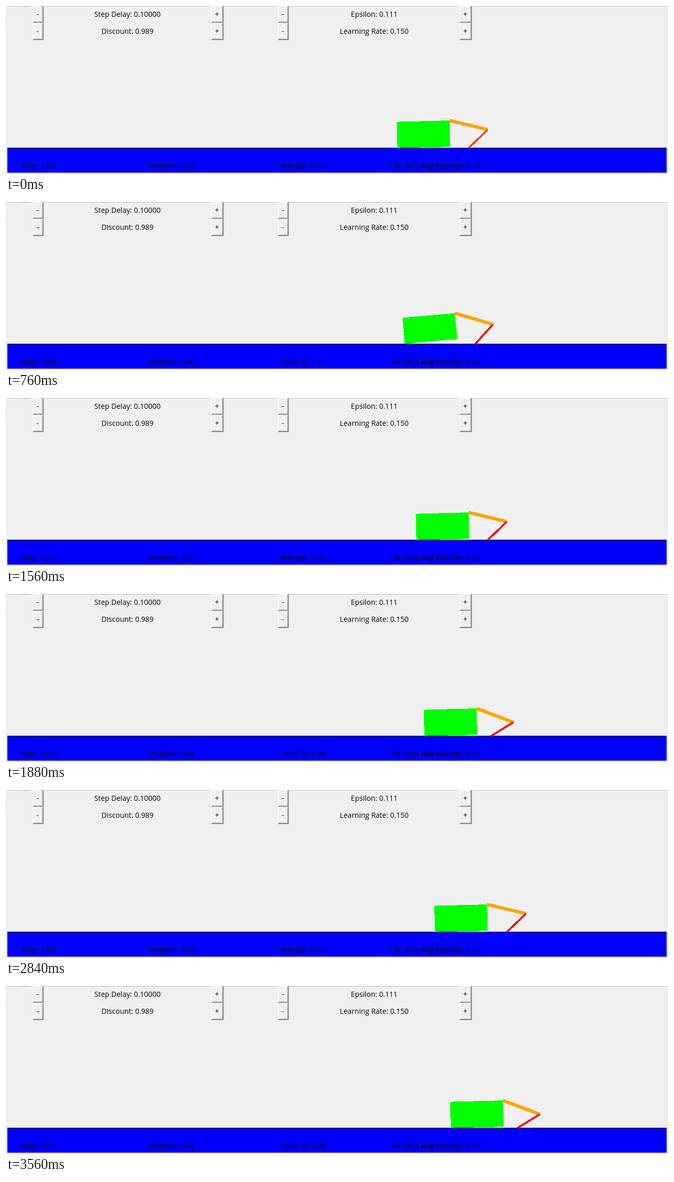
Animation, 1280 px wide and 326 px high, one loop 3600 ms. Source, as an HTML page:

```html
<!DOCTYPE html>
<html lang="en">
<head>
<meta charset="utf-8">
<title>Crawling robot</title>
<style>
  html, body { margin: 0; width: 100%; height: 100%; overflow: hidden; background: #f0f0f0; }
  svg { display: block; }
  text { font: 14px "Open Sans", "Noto Sans", sans-serif; text-anchor: middle; }
  #readout text { font-size: 14.3px; }
  .crisp { shape-rendering: crispEdges; }
</style>
</head>
<body>
<svg width="1280" height="326" viewBox="0 0 1280 326">
  <path class="crisp" d="M0 .5H1280" stroke="#c4c4c4"/>
  <path class="crisp" d="M30 .5H43" stroke="#909090"/>
  <path class="crisp" d="M.5 25V38" stroke="#d0d0d0"/>
  <g id="controls"></g>
  <path fill="#00f" d="M2.55 275H1277.45V323.45H2.55Z"/>
  <path d="M2.55 275.64H1277.45" stroke="#000" stroke-width="1.275"/>
  <g class="crisp" fill="none">
    <polygon id="body" fill="#0f0"/>
    <polyline id="arm" stroke="#ffa500" stroke-width="6.4"/>
    <polyline id="hand" stroke-width="3.8"/>
  </g>
  <g id="readout">
    <text id="step" x="64.3" y="314.5"/><text id="position" x="319.5" y="314.5"/>
    <text id="velocity" x="574" y="314.5"/><text id="average" x="829.5" y="314.5"/>
  </g>
</svg>
<script>
const $ = id => document.getElementById(id);
const LOOP = 3600, TICK = 40, FIRST_STEP = 1541;
// Robot units are whole canvas pixels, enlarged; points lie at pixel centres
const SCALE = 1.275, LEFT = SCALE / 2, GROUND = 275 + SCALE / 2;
const WIDTH = 80, HEIGHT = 40, ARM = 60, HAND = 40;

// Control rows: minus button, label, plus button
function button(x, y, w, sign) {
  const r = x + w, b = y + 33.2, edge = SCALE / 2, inner = SCALE * 1.5;
  return `<g fill="none" stroke-width="${SCALE}">
    <path d="M${x + edge} ${b}V${y + edge}H${r}" stroke="#fff"/>
    <path d="M${x + SCALE} ${b - inner}H${r - inner}V${y + SCALE}" stroke="#a0a0a0"/>
    <path d="M${x} ${b - edge}H${r - edge}V${y}" stroke="#696969"/></g>
    <text x="${x + w / 2 - .8}" y="${y + 21.5}">${sign}</text>`;
}
const control = (x, plusX, labelX, y, label) =>
  button(x, y, 20.6, "-") + button(plusX, y, 23.7, "+") +
  `<text x="${labelX}" y="${y + 21.5}">${label}</text>`;
$("controls").innerHTML =
  control(52, 397, 235, -.4, "Step Delay: 0.10000") +
  control(52, 397, 235, 32.8, "Discount: 0.989") +
  control(526, 877, 712, -.4, "Epsilon: 0.111") +
  control(526, 877, 712, 32.8, "Learning Rate: 0.150");

const rad = deg => deg * Math.PI / 180;
const armAngle = s => rad(-30 + 7.5 * s.arm);
const handAngle = s => rad(-150 + 12.5 * s.hand);

// Hand tip relative to the rear wheel of an untilted body
function tip(s) {
  const a = armAngle(s), h = handAngle(s);
  return { x: WIDTH + ARM * Math.cos(a) + HAND * Math.cos(h),
           y: HEIGHT + ARM * Math.sin(a) + HAND * Math.sin(h) };
}

// How far the body is dragged when the tip goes from p to q
function drag(p, q) {
  const crossing = p.x - p.y * (q.x - p.x) / (q.y - p.y);
  if (p.y >= 0 && q.y >= 0) return 0;
  return (p.y < 0 ? Math.hypot(p.x, p.y) : crossing) -
         (q.y < 0 ? Math.hypot(q.x, q.y) : crossing);
}

// u/d raise and lower the arm, o/c open and curl the hand
const MOVES = "o" + "dcocuudodcuo" + "docc" + "uodc".repeat(7) +
              "uodducuodcuo" + "uoddcc" + "uodc".repeat(2);
const states = [];
let current = { arm: 2, hand: 0, pos: 594.65 };
for (const move of MOVES) {
  const next = { ...current };
  if ("ud".includes(move)) next.arm += move === "u" ? 1 : -1;
  else next.hand += move === "o" ? 1 : -1;
  next.velocity = drag(tip(current), tip(next));
  next.pos += next.velocity;
  states.push(current = next);
}

function lerp(points, x) {
  const i = Math.max(1, points.findIndex(p => p[0] >= x));
  const [x0, y0] = points[i - 1], [x1, y1] = points[i];
  return y0 + (y1 - y0) * (x - x0) / (x1 - x0);
}
const STEP_AT = [[0, 0], [40, 1], [600, 12], [1160, 23], [1640, 32], [1720, 33], [2200, 43],
  [2280, 44], [2320, 45], [2800, 55], [2840, 56], [2880, 57], [3360, 66], [3440, 67], [3560, 70]];
const AVERAGE_AT = [[0, .74], [15, .8], [24, .62], [36, .62], [44, .69], [56, .8], [70, .96]];

const setPoints = (id, ...points) => $(id).setAttribute("points",
  points.map(p => [LEFT + Math.round(p.x) * SCALE, GROUND - Math.round(p.y) * SCALE]).join(" "));
const along = (p, length, angle) =>
  ({ x: p.x + length * Math.cos(angle), y: p.y + length * Math.sin(angle) });

function draw(time) {
  const k = Math.floor(lerp(STEP_AT, Math.floor(time / TICK) * TICK) + 1e-6);
  const s = states[k], t = tip(s);
  const tilt = t.y < 0 ? Math.atan(-t.y / t.x) : 0;
  const rear = { x: s.pos, y: 0 };
  const front = along(rear, WIDTH, tilt);
  const rearTop = along(rear, HEIGHT, tilt + Math.PI / 2);
  const shoulder = along(rearTop, WIDTH, tilt);
  const elbow = along(shoulder, ARM, armAngle(s) + tilt);
  setPoints("body", rear, front, shoulder, rearTop);
  setPoints("arm", shoulder, elbow);
  setPoints("hand", elbow, along(elbow, HAND, handAngle(s) + tilt));
  $("hand").setAttribute("stroke", k ? "#f00" : "#ff4500");
  $("step").textContent = `Step: ${FIRST_STEP + k}`;
  $("position").textContent = `Position: ${s.pos.toFixed(0)}`;
  $("velocity").textContent = `Velocity: ${s.velocity.toFixed(2)}`;
  $("average").textContent = `100-step Avg Velocity: ${lerp(AVERAGE_AT, k).toFixed(2)}`;
}

const start = performance.now();
function frame() {
  draw((performance.now() - start) % LOOP);
  requestAnimationFrame(frame);
}
frame();
</script>
</body>
</html>
```
